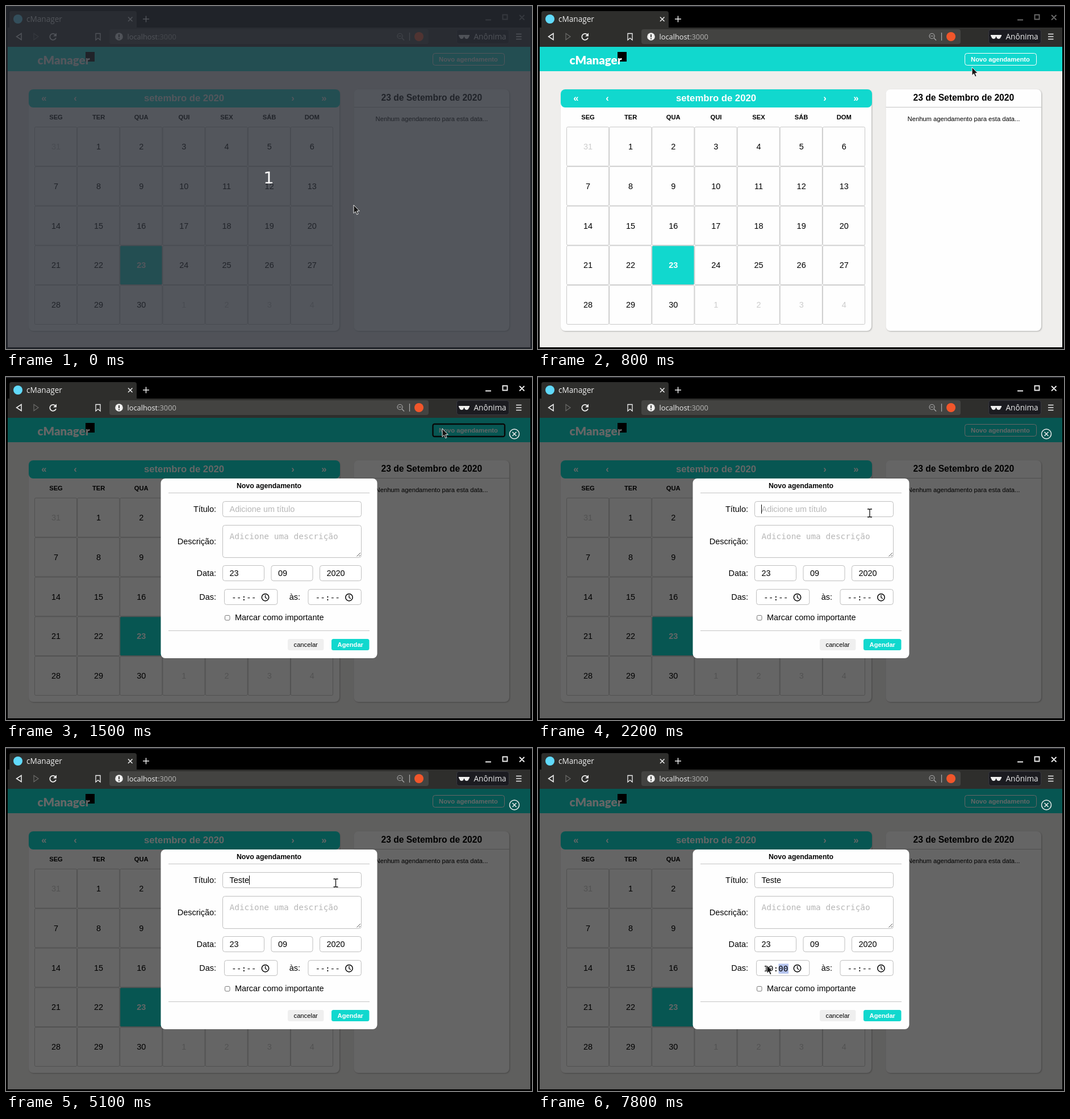
Recreate the animation shown at these times as an HTML page. Size 926 by 605 pixels, loop 8000 ms.

```html
<!DOCTYPE html>
<html lang="pt">
<head>
<meta charset="utf-8">
<title>cManager</title>
<style>
html, body { margin: 0; width: 100%; height: 100%; overflow: hidden; background: #000; }
svg { display: block; width: 926px; height: 605px; font-family: "Liberation Sans", Arial, sans-serif; }
text { white-space: pre; }
.ui { font-family: "Open Sans", "Noto Sans", sans-serif; fill: #eee; }
.mono { font-family: "DejaVu Sans Mono", monospace; font-size: 14.45px; }
.b { font-weight: bold; }
.mid { text-anchor: middle; }
.end { text-anchor: end; }
.body { font-size: 14.45px; }
.small { font-size: 11.2px; }
.w { fill: #fff; }
.teal { fill: #11d8ce; }
.hint { fill: #b7b7b7; }
.line { fill: none; stroke: #eee; stroke-width: 1.5; }
.rule { stroke: #c4c4c4; }
.field { fill: #fff; stroke: #bfbfbf; }
.sel { fill: #b5c4ee; }
.card { fill: #fefefe; filter: drop-shadow(1px 1px 1px #0004); }
</style>
</head>
<body>
<svg viewBox="0 0 926 605">
  <!-- browser window -->
  <rect width="926" height="605"/>
  <rect width="926" height="1.5" fill="#2c2e36"/>
  <path d="M6 38V13Q6 9 10 9H226Q230 9 230 13V38H923V72H3V38Z" fill="#2e2e2c"/>
  <circle cx="21" cy="23" r="8" fill="#61dafb"/>
  <text class="ui" x="36" y="28" font-size="13.6">cManager</text>
  <path class="line" d="M215 19.500l7.500 7.500m0-7.500l-7.500 7.500M246.500 17.500v11M241 23h11"/>
  <g id="controls" class="line" stroke-width="2">
    <path d="M844 24.500h10M874.500 15.500h8v8h-8ZM904 16l8.500 8.500m0-8.500l-8.500 8.500" style="stroke-width:1.9"/>
  </g>
  <path class="line" d="M27 48.500v11L18.500 54Z"/>
  <path class="line" d="M49 48.500v11L57 54Z" style="stroke:#6b6b69;stroke-width:1.2"/>
  <path class="line" d="M87.500 51.500A5.500 5.500 0 1 0 88 56" style="stroke-width:1.8"/>
  <path d="M89 47.500v6h-6Z" fill="#eee"/>
  <path class="line" d="M158 48.500h8v11.500l-4-3.500-4 3.500Z" style="stroke-width:1.3"/>
  <rect x="182" y="41" width="562" height="26" rx="4" fill="#434341"/>
  <circle cx="199" cy="54" r="6.800" fill="#eee"/>
  <path d="M198 50h2v5h-2zM198 56.500h2v2h-2z" fill="#434341"/>
  <text class="ui" x="213.500" y="58.700" font-size="12.8">localhost<tspan fill="#b5b5b3">:3000</tspan></text>
  <g class="line" style="stroke:#aaa;stroke-width:1.2">
    <circle cx="693.500" cy="53" r="4.500"/>
    <path d="M697 56.500l4 4M691 53h5M710.500 47v14"/>
  </g>
  <circle cx="727" cy="54" r="8" fill="#f1562b"/>
  <rect x="793.500" y="41.500" width="92" height="25" rx="4" fill="#1b1b20" stroke="#383840"/>
  <path d="M797 51h19v2l-1 1q-1 4-4 4-3.500 0-4-4h-1q-.5 4-4 4-3 0-4-4l-1-1Z" fill="#eee"/>
  <text class="ui" x="823.500" y="58.700" font-size="13.6">Anônima</text>
  <path class="line" d="M898 49.500h9.500M898 54h9.500M898 58.500h9.500"/>

  <!-- page -->
  <rect x="3" y="72" width="920" height="530" fill="#efeeec"/>
  <rect class="teal" x="3" y="72" width="920" height="43"/>
  <rect x="140" y="81" width="16" height="17"/>
  <text x="55.500" y="103" font-size="20.5" class="w" style="font-family:Lato,sans-serif;font-weight:900">cManager</text>
  <rect id="newBtn" x="751.500" y="83.500" width="126" height="21" rx="4" stroke="#fff"/>
  <text class="b mid small w" x="814" y="98">Novo agendamento</text>
  <rect class="card" x="40" y="147" width="547" height="426" rx="8"/>
  <rect class="teal" x="40" y="147" width="548" height="32" rx="8"/>
  <g id="calendar"></g>
  <rect class="card" x="612.500" y="147" width="273.500" height="426" rx="8"/>
  <path class="rule" d="M612.500 178.500h273.500"/>
  <text class="b mid" x="749.300" y="166.500" font-size="15.6">23 de Setembro de 2020</text>
  <text class="mid small" x="749.500" y="203">Nenhum agendamento para esta data...</text>

  <g id="modal">
    <rect x="3" y="72" width="920" height="530" opacity=".6"/>
    <rect id="ring" x="751.500" y="83" width="126.500" height="22" rx="3" fill="none" stroke="#060808" stroke-width="2.400"/>
    <g class="line">
      <circle cx="895" cy="100.500" r="8.500"/>
      <path d="M891.500 97l7 7m0-7l-7 7"/>
    </g>
    <rect x="272.500" y="179" width="381" height="317" rx="8" fill="#fefefe"/>
    <text class="b mid" x="463" y="195.500" font-size="12.3">Novo agendamento</text>
    <path class="rule" d="M286 204.500h354M286 447.500h354"/>
    <g id="form"></g>
    <path d="M617.500 316.500l6.500-6.500M621.500 316.500l2.500-2.500" stroke="#555"/>
    <text id="titleHint" class="body hint" x="393.500" y="237.500">Adicione um título</text>
    <text id="titleText" class="body" x="393.500" y="237.500"></text>
    <rect id="caret" y="225" width="1" height="16"/>
    <text class="mono hint" x="393.500" y="286">Adicione uma descrição</text>
    <rect id="hourSel" class="sel" x="396" y="380.500" width="18" height="17.500"/>
    <rect id="minSel" class="sel" x="423.500" y="380.500" width="17.500" height="17.500"/>
    <text id="start" class="mono" x="397" y="393.500"></text>
    <text class="mono" x="544.500" y="393.500">--:--</text>
    <rect x="385.500" y="420.500" width="8.500" height="8.500" rx="2" fill="#fff" stroke="#767676"/>
    <text class="body" x="403" y="429">Marcar como importante</text>
    <rect x="496" y="462" width="63.500" height="20" rx="3.500" fill="#efefef"/>
    <text class="mid small" x="527.700" y="476">cancelar</text>
    <rect class="teal" x="573" y="462" width="66.500" height="20" rx="3.500"/>
    <text class="b mid small w" x="606.300" y="476">Agendar</text>
  </g>

  <g id="count">
    <rect width="926" height="605" fill="#282c34" opacity=".8"/>
    <text class="mid w" x="462.500" y="313" font-size="29" style="font-family:'DejaVu Sans',sans-serif">1</text>
  </g>

  <g id="pointer">
    <path id="arrow" d="M0 0V14.500L3.300 11.500 5.600 16.800 8 15.800 5.800 10.600H10.200Z" fill="#151515" stroke="#fff" stroke-width=".9"/>
    <path id="hand" d="M.5 1.500Q2 -.5 3.300 1.500V6L9 7Q10.500 7.500 10.300 9.500L9.500 15H2.500L-3 9.500Q-3.500 7.500 -1.500 8L.5 9.500Z" fill="#fff" stroke="#111"/>
    <path id="beam" d="M-4 -7h3l1 1 1-1h3M-4 7h3l1-1 1 1h3M0 -6v12" fill="none" stroke="#111" stroke-width="1.300"/>
  </g>
</svg>
<script>
const $ = id => document.getElementById(id);
const LOOP = 8000;

function add(parent, tag, attrs, text = '') {
  const el = document.createElementNS('http://www.w3.org/2000/svg', tag);
  for (const k in attrs) el.setAttribute(k, attrs[k]);
  el.textContent = text;
  return parent.appendChild(el);
}

function buildCalendar() {
  const cal = $('calendar');
  const head = (x, s) => add(cal, 'text', { class: 'b mid w', x, y: 167.5, 'font-size': 16.7 }, s);
  head(67, '«'); head(122, '‹'); head(313.5, 'setembro de 2020'); head(505, '›'); head(560, '»');
  const dx = 75.13, dy = 69.8;
  ['SEG', 'TER', 'QUA', 'QUI', 'SEX', 'SÁB', 'DOM'].forEach((s, i) =>
    add(cal, 'text', { class: 'b mid small', x: 88 + i * dx, y: 200 }, s));
  for (let i = 0; i < 35; i++) {
    const c = i % 7, r = Math.floor(i / 7), on = i === 23;
    const day = i === 0 ? 31 : i > 30 ? i - 30 : i;
    add(cal, 'rect', {
      x: 50.5 + c * dx, y: 213.4 + r * dy, width: dx - 0.9, height: dy - 0.9, rx: 2,
      fill: on ? '#11d8ce' : '#fefefe', stroke: '#c8c8c8'
    });
    add(cal, 'text', {
      class: on ? 'b mid body' : 'mid body', x: 88 + c * dx, y: 253 + r * dy,
      fill: on ? '#fff' : i === 0 || i > 30 ? '#ccc' : '#000'
    }, day);
  }
}

function buildForm() {
  const form = $('form');
  const label = (x, y, s) => add(form, 'text', { class: 'body end', x, y }, s);
  const field = (x, y, width, height) => add(form, 'rect', { class: 'field', x, y, width, height, rx: 4 });
  label(370, 237.5, 'Título:');
  label(370, 294.5, 'Descrição:');
  label(370, 351, 'Data:');
  label(370, 393, 'Das:');
  label(518, 393, 'às:');
  field(381.5, 219.5, 244, 27);
  field(381.5, 261.5, 244, 57);
  ['23', '09', '2020'].forEach((s, i) => {
    const x = 381.5 + i * 85.5;
    field(x, 332.5, 73, 27);
    add(form, 'text', { class: 'body', x: x + 12, y: 351 }, s);
  });
  for (const x of [384.5, 532]) {
    field(x, 374.5, 93.3, 27);
    add(form, 'circle', { cx: x + 72, cy: 388.7, r: 6.2, fill: 'none', stroke: '#000', 'stroke-width': 1.5 });
    add(form, 'path', { d: `M${x + 72} 384.500v4.500l3 2`, fill: 'none', stroke: '#000', 'stroke-width': 1.3 });
  }
}

// Each track holds [start ms, ...values]; the last started entry applies.
const pointer = [
  [0, 'arrow', 612, 351], [100, 'arrow', 675, 336], [200, 'arrow', 687, 317], [300, 'arrow', 696, 298],
  [400, 'arrow', 700, 285], [600, 'arrow', 718, 230], [700, 'arrow', 746, 152], [800, 'arrow', 764, 108],
  [1100, 'hand', 768, 98], [1200, 'hand', 768, 92], [1300, 'hand', 768, 90], [1500, 'arrow', 768, 91],
  [1600, 'arrow', 757, 101], [1700, 'arrow', 715, 134], [1800, 'arrow', 648, 186],
  [1900, 'beam', 592, 231], [2000, 'beam', 584, 240], [2600, 'beam', 580.5, 238],
  [5200, 'beam', 570, 278], [5300, 'arrow', 511, 329], [5500, 'arrow', 448, 368], [5600, 'arrow', 412, 381],
  [5800, 'arrow', 404, 384], [5900, 'arrow', 402, 382], [6500, 'arrow', 403, 383]
];
const typed = [[0, ''], [3300, 'T'], [3600, 'Te'], [3700, 'Tes'], [3900, 'Test'], [4000, 'Teste']];
const caret = [[0, 0], [2200, 1], [2800, 0], [3300, 1], [4600, 0], [5100, 1], [5800, 0]];
const start = [[0, '--:--'], [7100, '01:--'], [7400, '10:--'], [7800, '10:00']];

const at = (track, t) => track.filter(e => e[0] <= t).pop();
const show = (id, on) => $(id).style.display = on ? '' : 'none';

function draw(t) {
  const [, shape, x, y] = at(pointer, t);
  $('pointer').setAttribute('transform', `translate(${x} ${y})`);
  for (const s of ['arrow', 'hand', 'beam']) show(s, s === shape);

  show('count', t < 100);
  show('modal', t >= 1500);
  show('ring', t < 2200);
  $('controls').style.opacity = t < 1400 ? 0.45 : 1;
  const hover = Math.min(1, Math.max(0, (t - 1000) / 300));
  $('newBtn').setAttribute('fill', t < 1500 ? `rgba(20,250,242,${hover})` : 'none');

  const text = at(typed, t)[1];
  $('titleText').textContent = text;
  show('titleHint', !text);
  show('caret', at(caret, t)[1]);
  if (t >= 2200) $('caret').setAttribute('x', Math.round(393 + $('titleText').getComputedTextLength()));

  $('start').textContent = at(start, t)[1];
  show('hourSel', t >= 5800 && t < 7400);
  show('minSel', t >= 7400);
}

function tick(now) {
  draw(now % LOOP);
  requestAnimationFrame(tick);
}

buildCalendar();
buildForm();
draw(0);
requestAnimationFrame(tick);
</script>
</body>
</html>
```
